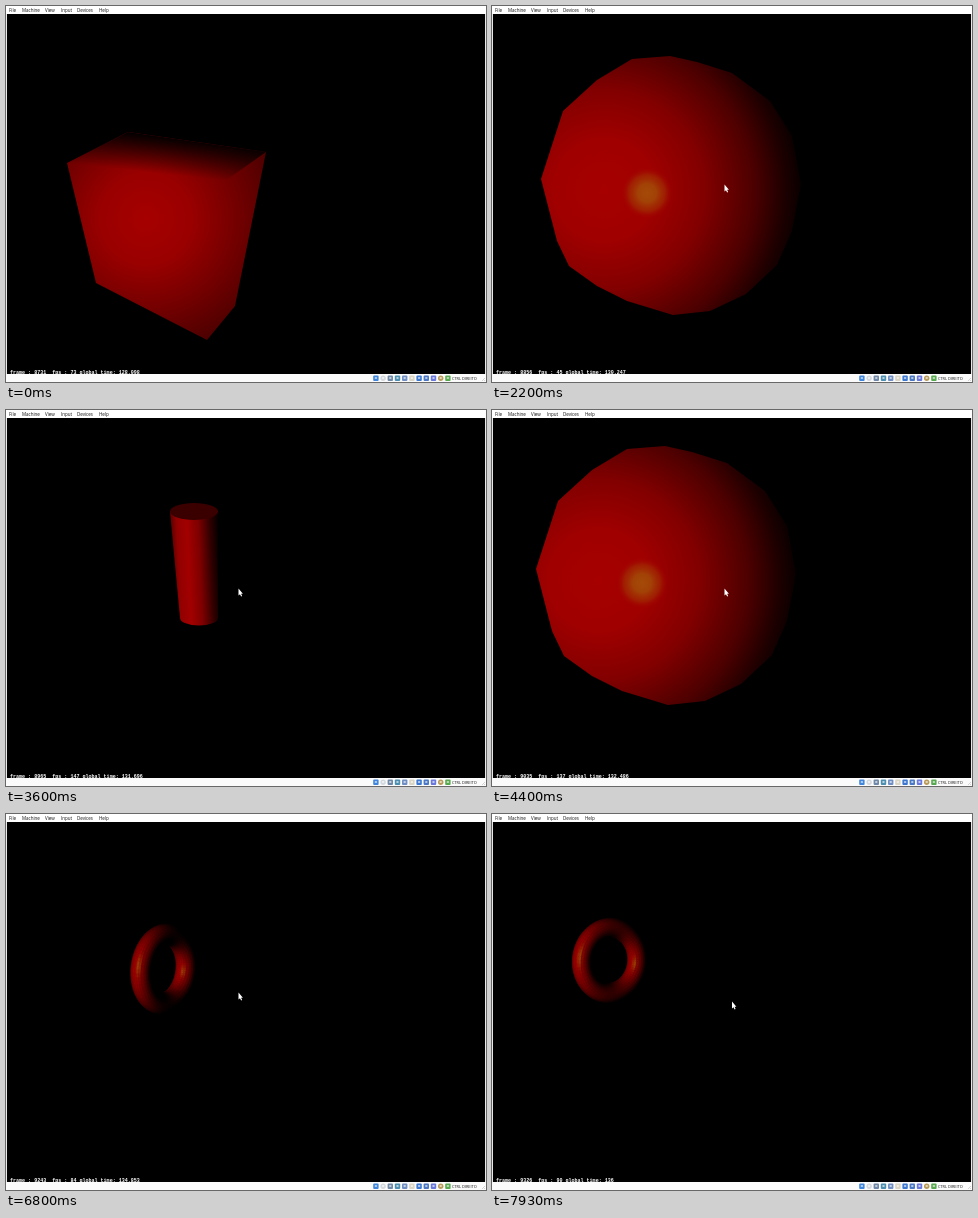
Animation of 480 by 376 pixels, one loop 8000 ms. Source, as an HTML page with a canvas:

```html
<!DOCTYPE html>
<html lang="en">
<head>
<meta charset="utf-8">
<title>Primitive shapes</title>
<style>
  html, body { margin: 0; width: 100%; height: 100%; overflow: hidden; background: #fff; }
  canvas, svg { position: absolute; left: 0; top: 0; display: block; }
  text { font-family: "Open Sans", sans-serif; font-size: 4.5px; fill: #111; }
  #stats { font: bold 5.04px "Liberation Mono", monospace; fill: #fff; white-space: pre; }
</style>
</head>
<body>
<canvas id="stage" width="480" height="376"></canvas>
<svg width="480" height="376" viewBox="0 0 480 376">
  <text id="stats" x="4" y="368.4"></text>
  <path id="cursor" d="M0 0V7L1.5 5.7 2.6 8 3.6 7.5 2.6 5.3H4.4Z" fill="#fff"/>
  <rect width="480" height="8" fill="#fff"/>
  <rect y="368" width="480" height="8" fill="#fbfbfb"/>
  <path d="M.5 8V368M479.5 8V368" stroke="#e8e8e8"/>
  <g id="menu"></g>
  <g id="icons"></g>
  <text x="446" y="374" style="font-size:3.9px">CTRL DIREITO</text>
  <path d="M476 375l3-3M478 375l1-1" stroke="#bbb" stroke-width=".6"/>
</svg>
<script>
const LOOP = 8000, STEP = 1000 / 15;
const ctx = document.getElementById('stage').getContext('2d');
const stats = document.getElementById('stats');
const cursor = document.getElementById('cursor');

const menu = { File: 3, Machine: 16, View: 39, Input: 55, Devices: 71, Help: 93 };
document.getElementById('menu').innerHTML = Object.entries(menu)
  .map(([label, x]) => `<text x="${x}" y="5.8">${label}</text>`).join('');

const iconColors = ['#3f86dc', '#d3d8de', '#7088a8', '#4d8fb0', '#6f8fc4', '#d9d4c4',
  '#3c78d0', '#4a78c4', '#6a78dc', '#b89a58', '#58a850'];
document.getElementById('icons').innerHTML = iconColors.map((color, i) => {
  const x = 367.2 + i * 7.2, round = [1, 9].includes(i) ? 2.7 : 1;
  return `<rect x="${x}" y="369.5" width="5.4" height="5.4" rx="${round}" fill="${color}"/>
    <rect x="${x + 1.5}" y="371" width="2.4" height="2" rx=".8" fill="#fff" opacity=".6"/>`;
}).join('');

const mix = (a, b, k) => a + (b - a) * k;

// Linear interpolation through rows of [time, value, value, ...].
function track(rows, t) {
  let i = 0;
  while (i < rows.length - 2 && t >= rows[i + 1][0]) i++;
  const [a, b] = [rows[i], rows[i + 1]];
  const k = Math.min(1, Math.max(0, (t - a[0]) / (b[0] - a[0])));
  return a.slice(1).map((v, j) => mix(v, b[j + 1], k));
}

function shade(gradient, stops) {
  stops.forEach(([at, color]) => gradient.addColorStop(at, color));
  return gradient;
}
const red = v => `rgb(${v},0,0)`;
const reds = stops => stops.map(([at, v]) => [at, red(v)]);

function polygon(points, fill) {
  ctx.beginPath();
  points.forEach(p => ctx.lineTo(...p));
  ctx.closePath();
  ctx.fillStyle = fill;
  ctx.fill();
}

// Corners: three along the top, three along the bottom, then the near top corner.
const cubeNear = [[61, 157], [122, 126], [260, 146], [229, 300], [201, 334], [90, 277], [219, 175]];
const cubeFar = [[81, 130], [132, 106], [257, 122], [232, 262], [206, 288], [105, 242], [222, 147]];

function fadeFace(points, from, to, depth) {
  const dx = to[0] - from[0], dy = to[1] - from[1], len = Math.hypot(dx, dy);
  const g = ctx.createLinearGradient(...from, from[0] + dy / len * depth, from[1] - dx / len * depth);
  polygon(points, shade(g, [[0, 'rgba(0,0,0,0)'], [.5, 'rgba(0,0,0,.48)'], [1, 'rgba(0,0,0,.97)']]));
}

function cube(t) {
  const k = Math.min(1, t / 870), size = mix(1, .87, k);
  const corners = cubeNear.map((p, i) => p.map((v, j) => mix(v, cubeFar[i][j], k)));
  const [a, b, c, d, e, f, n] = corners;
  const x = mix(140, 150, k), y = mix(213, 190, k);
  polygon([a, b, c, d, e, f], shade(ctx.createRadialGradient(x, y, 0, x, y, 150 * size),
    reds([[0, 166], [.3, 154], [.6, 116], [1, 64]])));
  fadeFace([a, b, c, n], a, n, 37 * size);
  fadeFace([n, c, d, e], e, n, -37 * size * -1);
}

const ballOutline = [[140, 53], [178, 50], [205, 56], [240, 67], [278, 95], [300, 130], [309, 178],
  [300, 225], [285, 259], [254, 288], [218, 305], [181, 309], [135, 295], [105, 280], [77, 260],
  [65, 235], [49, 173], [71, 105], [105, 74]];

function ball(dx, dy) {
  ctx.save();
  ctx.translate(dx, dy);
  polygon(ballOutline, shade(ctx.createRadialGradient(112, 184, 0, 112, 184, 200),
    reds([[0, 166], [.25, 160], [.5, 130], [.75, 76], [.9, 30], [1, 6]])));
  polygon(ballOutline, shade(ctx.createRadialGradient(155, 187, 0, 155, 187, 26),
    [[0, 'rgb(164,74,8)'], [.35, 'rgb(162,66,6)'], [.7, 'rgba(160,42,2,.7)'], [1, 'rgba(160,0,0,0)']]));
  ctx.restore();
}

function cylinder() {
  ctx.beginPath();
  ctx.moveTo(164, 102);
  ctx.lineTo(174, 208);
  ctx.ellipse(193, 208, 19, 7.5, 0, Math.PI, 0, true);
  ctx.lineTo(211.5, 102);
  ctx.fillStyle = shade(ctx.createLinearGradient(167, 152, 212, 150),
    reds([[0, 96], [.12, 146], [.35, 162], [.6, 126], [.85, 50], [1, 14]]));
  ctx.fill();
  ctx.beginPath();
  ctx.ellipse(188, 101.5, 24, 8.5, 0, 0, 7);
  ctx.fillStyle = red(58);
  ctx.fill();
}

function cone() {
  ctx.beginPath();
  ctx.moveTo(188, 102);
  ctx.lineTo(173, 208);
  ctx.ellipse(193, 208, 20, 7.5, 0, Math.PI, 0, true);
  ctx.fillStyle = shade(ctx.createConicGradient(1.34, 188, 102),
    reds([[0, 12], [.012, 48], [.027, 122], [.042, 162], [.052, 148], [.06, 106]]));
  ctx.fill();
}

const dot = (a, b) => a[0] * b[0] + a[1] * b[1] + a[2] * b[2];
const light = [-.55, 0, .835], half = [-.287, 0, .958];

function torus(t) {
  const [x, y, major, facing] = track([[6150, 187, 160, 34.5, .65], [6800, 158, 155, 34.5, .65],
    [7300, 137, 138, 33.5, .75], [7700, 118, 146.5, 32.5, .85]], t);
  const minor = major * .305, side = Math.sqrt(1 - facing * facing);
  const U = 72, V = 28, TAU = Math.PI * 2;
  const point = (i, j) => {
    const u = i / U * TAU, v = j / V * TAU, c = Math.cos(v), s = Math.sin(v);
    const out = [Math.cos(u) * facing, Math.sin(u), -Math.cos(u) * side];
    const normal = [out[0] * c + side * s, out[1] * c, out[2] * c + facing * s];
    return { normal, pos: out.map((o, k) => o * major + normal[k] * minor) };
  };
  const quads = [];
  for (let i = 0; i < U; i++) for (let j = 0; j < V; j++) {
    const { normal, pos } = point(i + .5, j + .5);
    if (normal[2] < -.15) continue;
    const corners = [[0, 0], [1, 0], [1, 1], [0, 1]]
      .map(([p, q]) => point(i + p, j + q).pos.slice(0, 2));
    quads.push({ corners, normal, depth: pos[2] });
  }
  quads.sort((a, b) => a.depth - b.depth);
  ctx.save();
  ctx.translate(x, y);
  ctx.rotate(.13);
  ctx.lineWidth = .5;
  for (const { corners, normal } of quads) {
    const diffuse = Math.max(0, dot(normal, light)) ** 1.3;
    const shine = Math.max(0, dot(normal, half)) ** 50;
    polygon(corners, ctx.strokeStyle = `rgb(${156 * diffuse + 8 * shine},${66 * shine},${8 * shine})`);
    ctx.stroke();
  }
  ctx.restore();
}

const scenes = [[1467, cube], [2800, () => ball(0, 0)], [4000, cylinder],
  [4733, () => ball(-5, -14)], [5700, cone], [LOOP, torus]];

// Time, rendered frames, frames per second, global time.
const counters = [[0, 8731, 73, 128.098], [1200, 8809, 68, 129.277], [2200, 8856, 45, 130.247],
  [3600, 8965, 147, 131.696], [5533, 9134, 122, 133.604], [6800, 9243, 84, 134.853],
  [7933, 9326, 90, 136]];

function draw(now) {
  const t = Math.floor((now % LOOP + 5) / STEP) * STEP % LOOP;
  ctx.fillStyle = '#000';
  ctx.fillRect(1, 8, 478, 360);
  scenes.find(([end]) => t < end)[1](t);

  const [frames, fps, time] = track(counters, t);
  stats.textContent = `frame : ${Math.round(frames)}  fps : ${Math.round(fps)} ` +
    `global time: ${Math.round(time * 1000) / 1000}`;

  const moved = t >= 7730;
  cursor.setAttribute('transform', moved ? 'translate(240 187.5)' : 'translate(232.5 178.5)');
  cursor.style.display = moved || (t > 900 && t < 6950) ? '' : 'none';
}

const start = performance.now();
function loop() {
  draw(performance.now() - start);
  requestAnimationFrame(loop);
}
loop();
</script>
</body>
</html>
```
